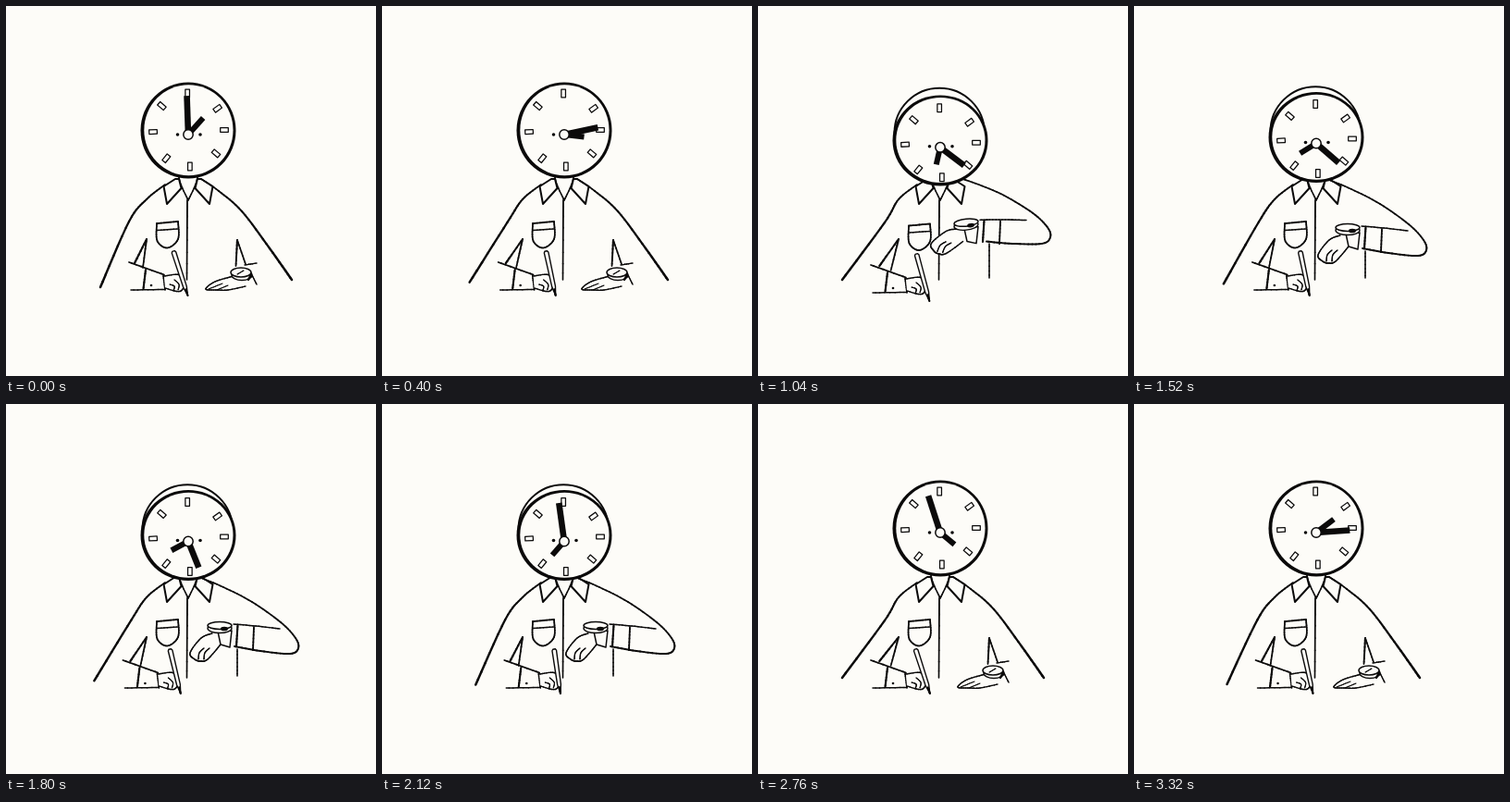
An HTML page with a canvas that plays this animation: 400 px wide and 400 px high, repeating every 3400 ms.

```html
<!DOCTYPE html>
<html lang="en">
<head>
<meta charset="utf-8">
<title>Clock head at a desk</title>
<style>
html, body { margin: 0; width: 100%; height: 100%; overflow: hidden; background: #fdfcf8; }
canvas { display: block; width: 400px; height: 400px; }
</style>
</head>
<body>
<canvas id="stage"></canvas>
<script>
const PAPER = '#fdfcf8', INK = '#0b0a0a', LOOP = 3400, TURN = 1740;
const NOD = 720, RAISE = 880, REST = 1200;
const canvas = document.getElementById('stage');
const ctx = canvas.getContext('2d');
const ratio = window.devicePixelRatio || 1;
canvas.width = canvas.height = 400 * ratio;

const clamp = v => Math.min(1, Math.max(0, v));
const wave = (t, from, to) => t > from && t < to ? Math.sin(Math.PI * (t - from) / (to - from)) : 0;

// Everything that moves, from the time alone
function pose(t) {
  const nodding = t >= NOD;
  const swing = t >= RAISE && t < REST ? Math.sin(Math.PI * (t - 920) / 240) : 0;
  const lift = swing * (t < 1160 ? 1 : 0);
  const over = Math.max(0, lift);
  const v = (t - NOD) / 800;
  const minute = nodding ? 773 + 798 * v * (1.6 - 0.6 * v) : 1.1 * t - 2;
  return {
    lift, over, minute,
    hour: 42 + minute / 8,
    raised: t >= RAISE,
    blink: nodding && t < RAISE,
    nod: nodding ? 1 + 0.45 * over : 0,
    hop: 24 * wave(t, NOD, 1040),
    dip: nodding && t < REST ? 2.5 : 0,
    stroke: clamp((t < REST ? t : t - 1240) / 600), // pen crosses the page, then returns
    wiggle: 1.5 * Math.cos(t / 45)
  };
}

// Catmull-Rom curve through flat x,y points
function spline(flat) {
  const p = [], out = [];
  for (let i = 0; i < flat.length; i += 2) p.push([flat[i], flat[i + 1]]);
  for (let i = 0; i < p.length - 1; i++) {
    const a = p[i - 1] || p[i], b = p[i], c = p[i + 1], d = p[i + 2] || c;
    for (let u = 0; u < 1; u += 0.125) {
      out.push([0, 1].map(n => 0.5 * (2 * b[n] + (c[n] - a[n]) * u +
        (2 * a[n] - 5 * b[n] + 4 * c[n] - d[n]) * u * u +
        (3 * b[n] - a[n] - 3 * c[n] + d[n]) * u * u * u)));
    }
  }
  out.push(p[p.length - 1]);
  return out;
}

// Brush line whose width runs from w0 to w1
function ink(flat, w0 = 1.5, w1 = w0) {
  const p = spline(flat);
  for (let i = 1; i < p.length; i++) {
    ctx.lineWidth = w0 + (w1 - w0) * i / p.length;
    ctx.beginPath();
    ctx.moveTo(...p[i - 1]);
    ctx.lineTo(...p[i]);
    ctx.stroke();
  }
}

function blob(flat, w) {
  ctx.fillStyle = PAPER;
  ctx.beginPath();
  spline(flat).forEach(q => ctx.lineTo(...q));
  ctx.fill();
  ink(flat, w);
}

function poly(flat, w) {
  ctx.beginPath();
  for (let i = 0; i < flat.length; i += 2) ctx.lineTo(flat[i], flat[i + 1]);
  ctx.closePath();
  ctx.fillStyle = PAPER;
  ctx.fill();
  ctx.lineWidth = w;
  ctx.stroke();
}

function oval(x, y, rx, ry, fill, w) {
  ctx.beginPath();
  ctx.ellipse(x, y, rx, ry, 0, 0, Math.PI * 2);
  ctx.fillStyle = fill;
  ctx.fill();
  if (w) { ctx.lineWidth = w; ctx.stroke(); }
}

// Runs paint inside a moved frame
function shifted(x, y, paint) {
  ctx.save();
  ctx.translate(x, y);
  paint();
  ctx.restore();
}

function shirt(p) {
  for (const side of [-1, 1]) {
    shifted(197, 0, () => {
      ctx.scale(side, 1);
      ink([9, 168, 9.5, 188, 0, 210], 1.6);
      poly([14, 187, 26.5, 195, 23, 214, 7.5, 197, 10, 187], 2);
    });
  }
  ink([196, 210, 195.5, 296], 1.9, 1.6);
  shifted(174.5, 234 + p.dip, () => {
    ink([-11.5, 1, 11.5, -1], 1.8);
    ink([-11.5, 1, -11, 20, 0, 27.5, 11.5, 18, 11.5, -1], 1.7);
    ink([-11.5, 8.5, 11.5, 7], 1.5);
  });
}

function pen(x, y, tipX, tipY) {
  const len = Math.hypot(tipX - x, tipY - y);
  shifted(x, y, () => {
    ctx.rotate(Math.atan2(tipY - y, tipX - x));
    poly([0, -1.3, 1.5, -2.3, len - 10, -1.9, len, 0, len - 10, 1.9, 1.5, 2.3, 0, 1.3], 1.4);
    ink([len - 7, 0, len, 0], 2);
  });
}

function writingArm(p) {
  const s = p.stroke, dx = -11 * s, dy = 3 * p.over;
  ink([172, 193, 152, 209, 133 + 4 * s, 233 + s, 102 + dx, 304 - 8 * s], 1.6, 2.6);
  ink([152, 252, 139 + 0.7 * dx, 278 + dy], 1.9, 2.3);
  ink([152, 252, 148 + 0.4 * dx, 283 + dy], 2, 1.6);
  shifted(dx, dy, () => {
    ink([133, 277, 171, 290.5], 1.7);
    ink([135, 307, 172, 306.5], 1.5);
    ink([151, 285, 148.5, 306], 2.1);
    ink([170, 291, 172, 307], 1.6);
    oval(157, 302, 1.3, 1.3, INK);
    blob([171, 292, 187, 290.5, 193, 299, 188, 308.5, 172, 305], 1.4);
    ink([182, 296, 187, 301, 186, 307], 1.2);
    ink([177, 301, 182, 303, 181, 308], 1.2);
  });
  pen(184 - 14 * s - 2 * p.wiggle, 265 + dy, 195 - 9 * s + p.wiggle, 313 + 2 * dy);
}

function restingArm() {
  ink([211, 187, 230, 200, 255, 222, 285, 262, 309, 296], 1.5, 2.6);
  ink([250, 253, 248.5, 281], 2.2, 1.7);
  ink([250, 253, 259, 279], 1.7);
  ink([258, 280, 271, 278], 1.4);
  ink([266, 291, 271, 301], 1.4);
  blob([246, 292, 226, 298, 216, 306, 228, 307, 240, 307, 259, 303], 1.4);
  ink([219, 306, 234, 300], 1.1);
  ink([228, 307, 240, 302], 1.1);
  oval(255, 291, 11, 5.5, PAPER, 1.5);
  oval(254, 288, 11, 5, PAPER, 1.5);
  ink([262, 296, 265, 290], 2);
  ink([250, 290, 257, 286], 1.1);
}

function raisedArm({ lift }) {
  ink([250, 265 - 8 * lift, 250, 294], 1.6);
  ctx.save();
  // Lifting shears the arm about the shoulder
  const slope = -0.095 * lift;
  ctx.transform(1, slope, 0, 1, 0, -4 * lift - 211 * slope);
  ink([211, 188, 235, 198, 266, 214, 297, 236, 313, 253, 316, 264, 307, 270, 275, 267, 247, 262], 1.6, 2);
  ctx.translate(-6 * lift, 0);
  ink([246, 238, 270, 240, 296, 243], 1.5);
  ink([250.5, 239, 249, 262], 2.1);
  ink([268, 241, 267, 266], 1.8);
  shifted(231, 245, () => {
    ctx.rotate(0.3 * lift);
    blob([-8, 3, -20, 8, -32, 24, -27, 31, -21, 33, -13, 31, 1, 15], 1.5);
    for (const x of [-23, -17]) ink([x, 31, x + 1, 24, x + 6, 19], 1.3);
  });
  poly([229, 246, 232, 260, 242, 263, 244, 245], 1.5);
  oval(231, 242.5, 13, 5, PAPER, 1.4);
  oval(231, 239.5, 13, 4, PAPER, 1.5);
  oval(236, 243, 4, 2.3, INK);
  ctx.restore();
}

function clockHand(y, deg, base, swing, w) {
  const a = deg * Math.PI / 180, len = base + swing * Math.cos(a);
  ctx.lineCap = 'butt';
  ctx.lineWidth = w;
  ctx.beginPath();
  ctx.moveTo(197, y);
  ctx.lineTo(197 + Math.sin(a) * len, y - Math.cos(a) * len);
  ctx.stroke();
  ctx.lineCap = 'round';
}

function head(p) {
  const squash = Math.min(1, p.nod), y = 134.5 + 7.5 * p.nod;
  const hub = 139 + 9.5 * p.nod;
  shifted(0, -p.hop, () => {
    oval(196.2, 135.7 + 1.5 * p.over, 48.7, 48.5, PAPER, 2);
    oval(197, y, 51.5, 52 - 3 * squash, INK);
    oval(197.4, y - 0.3, 48.1, 49 - 3 * squash, PAPER);

    const lean = [-2, 9, 0, -5, -2, -6, -3, -4];
    lean.forEach((off, i) => {
      const a = (45 * i + off) * Math.PI / 180;
      shifted(197.5 + 38.5 * Math.sin(a), 134 + 9.5 * p.nod - (39.5 - 2 * squash) * Math.cos(a), () => {
        ctx.rotate(i % 4 ? a : 0);
        ctx.lineWidth = 1.25;
        ctx.strokeRect(-2.3, -4.3, 4.6, 8.6);
      });
    });

    for (const x of [185.5, 210]) {
      if (p.blink) ink([x - 3, hub, x, hub + 1.5, x + 3, hub], 1.3);
      else oval(x, hub - squash, 1.8, 1.8, INK);
    }
    clockHand(hub, p.hour, 22, 3, 6);
    clockHand(hub, p.minute, 36, 6, 6.6);
    oval(197, hub, 5.2, 5.2, PAPER, 1.5);
  });
}

// Plays forward, then back, on steps of 80 ms with one faster pair at the hop
function poseTime(now) {
  let t = now % LOOP;
  if (t >= TURN) t = 2 * TURN - t - 0.01;
  const step = t >= 880 && t < 960 ? 40 : 80;
  return Math.min(1680, Math.floor(t / step) * step);
}

function draw(now) {
  const p = pose(poseTime(now));
  ctx.setTransform(ratio, 0, 0, ratio, 0, 0);
  ctx.fillStyle = PAPER;
  ctx.fillRect(0, 0, 400, 400);
  ctx.strokeStyle = INK;
  ctx.lineCap = ctx.lineJoin = 'round';
  shirt(p);
  writingArm(p);
  if (p.raised) raisedArm(p);
  else restingArm();
  head(p);
}

let start = null;
function loop(now) {
  if (start === null) start = now;
  draw(now - start);
  requestAnimationFrame(loop);
}
draw(0);
requestAnimationFrame(loop);
</script>
</body>
</html>
```
